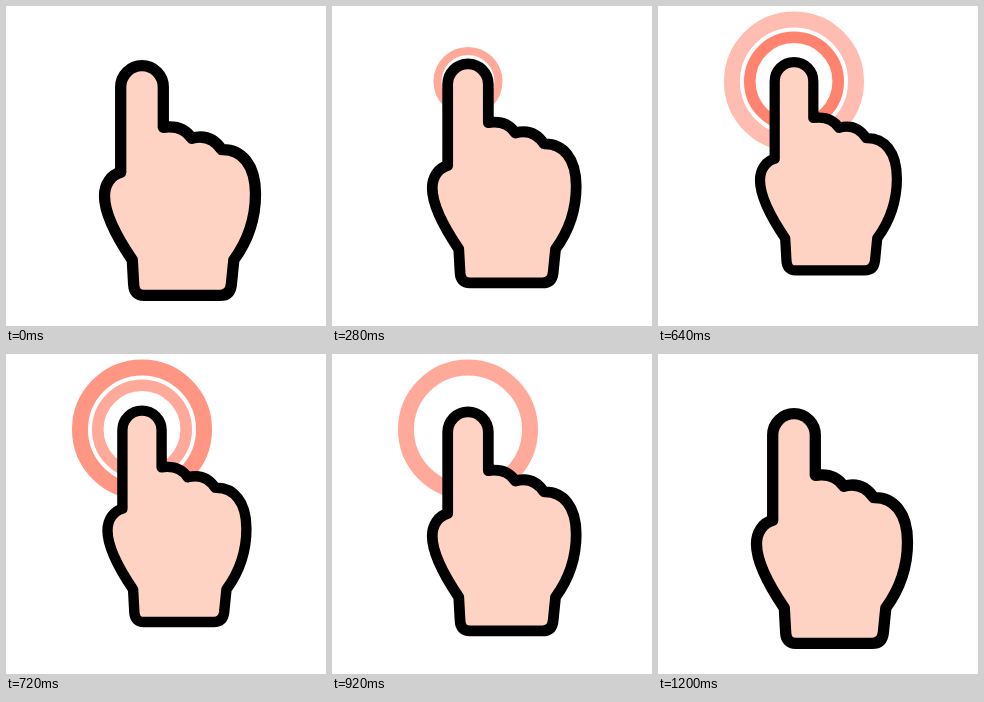
An HTML page that plays this animation: 320x320 px, repeating every 1240 ms.

```html
<!DOCTYPE html>
<html lang="en">
<head>
<meta charset="utf-8">
<title>Tap</title>
<style>
  html, body { margin: 0; width: 100%; height: 100%; overflow: hidden; background: #fff; }
  svg { display: block; width: 100%; height: 100%; }
  circle { fill: none; stroke: #ff7058; }
  path { fill: #ffd3c3; stroke: #000; stroke-width: 11.3; stroke-linejoin: round; }
</style>
</head>
<body>
<svg viewBox="0 0 320 320">
  <g id="rings">
    <circle cx="136" cy="75.5" r="30.5" stroke-width="8"/>
    <circle cx="136" cy="75.5" r="44.2" stroke-width="11.6"/>
    <circle cx="136" cy="75.5" r="62" stroke-width="16"/>
  </g>
  <path id="hand" d="M114.7 166.3V81A21.3 21.3 0 0 1 157.3 81V121.3
    C170 119.5 180 123.5 185.7 132.2C199 128.5 209 133.5 215.7 143.6
    C236 143 249.5 159 249.5 188C249.5 214 241 236 227.8 254
    L225.3 279Q224 289.4 214 289.4H138Q128.3 289.4 127.7 279L126.3 254
    C110 230 98.5 207 98.5 190C98.5 178 105 169 114.7 166.3Z"/>
</svg>
<script>
  const LOOP = 1240, STEP = 40, HALF = 600;
  const PEAKS = [400, 600, 800], FADE = 300, MIN_ALPHA = 0.25;
  const PIVOT = { x: 136, y: 21 };
  const hand = document.getElementById('hand');
  const rings = [...document.querySelectorAll('#rings circle')];

  // 1 at the peak, falling linearly to 0 on both sides
  const tent = (t, peak, width) => Math.max(0, 1 - Math.abs(t - peak) / width);

  function draw(ms) {
    const t = Math.floor((ms % LOOP) / STEP) * STEP;
    const scale = 1 - 0.1 * tent(t, HALF, HALF);
    hand.setAttribute('transform',
      `translate(${PIVOT.x} ${PIVOT.y}) scale(${scale}) translate(${-PIVOT.x} ${-PIVOT.y})`);
    rings.forEach((ring, i) => {
      const alpha = tent(t, PEAKS[i], FADE);
      ring.setAttribute('opacity', alpha < MIN_ALPHA ? 0 : alpha);
    });
  }

  const start = performance.now();
  function tick() {
    draw(performance.now() - start);
    requestAnimationFrame(tick);
  }
  tick();
</script>
</body>
</html>
```
